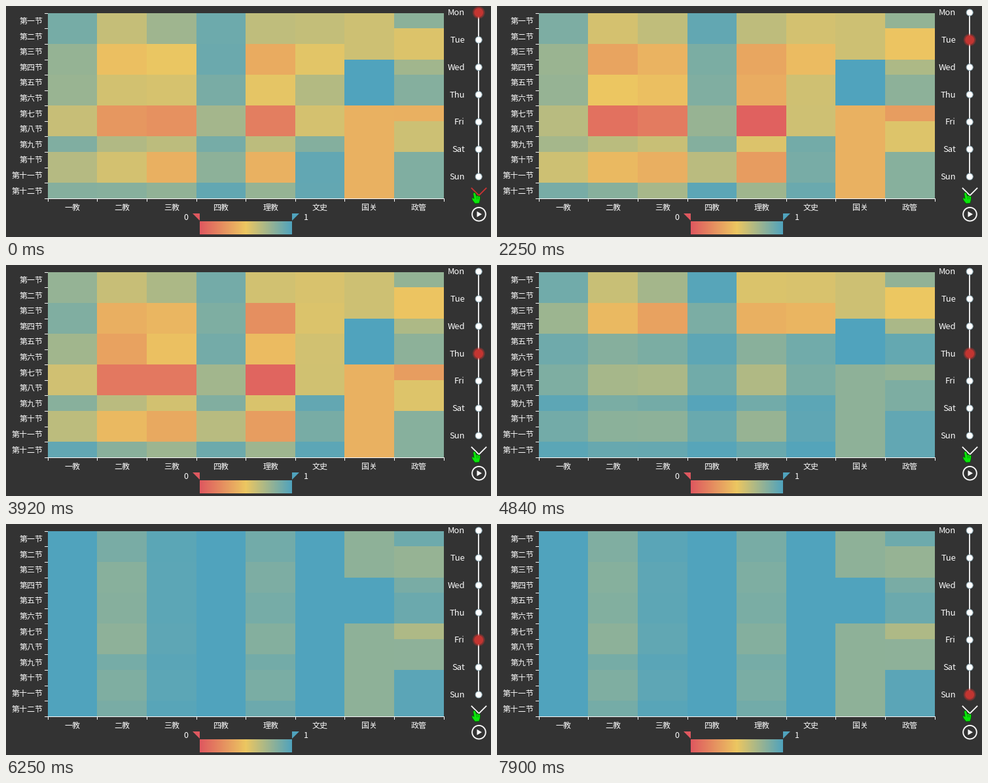
Animation, 741 px wide and 353 px high, one loop 8000 ms. Source, as a matplotlib script:

```python
import numpy as np
import matplotlib.pyplot as plt
from matplotlib.animation import FuncAnimation
from matplotlib.collections import LineCollection
from matplotlib.patches import Circle, Polygon

W, H, DPI = 741, 353, 100
LOOP, STEP = 8000, 20
FONT = "Noto Sans CJK JP"
BG, WHITE, RED = "#333333", "#fafafa", "#c23531"
LEFT, RIGHT, TOP, BOTTOM = 64, 668.8, 11, 294
SCALE = np.array([(223, 88, 95), (236, 199, 97), (80, 163, 189)]) / 255

DAYS = ["Mon", "Tue", "Wed", "Thu", "Fri", "Sat", "Sun"]
PERIODS = ["第%s节" % n for n in
           ["一", "二", "三", "四", "五", "六", "七", "八", "九", "十", "十一", "十二"]]
SWITCHES = [500, 2250, 3650, 4840, 6250, 7630]

# How full a hall is in its first and last class, and at weekends
HALLS = {"一教": (.4, .8, 0), "二教": (1.15, 1.2, 1), "三教": (1, 1.4, .25),
         "四教": (.15, .6, 0), "理教": (1.25, 1.4, .85), "文史": (1.2, .05, 0)}
NAMES = [*HALLS, "国关", "政管"]
CLASSES = [2, 2, 2, 2, 1, 2, 1]
DEMAND = np.array([.33, .54, .44, .70, .29, .47, .17])


def px(n):
    return n * 72 / DPI


def colours(values):
    return np.stack([np.interp(values, [0, .5, 1], c) for c in SCALE.T], axis=-1)


def week_factor(d):
    """Load by period: steady to Thursday, a light Friday afternoon, a quiet weekend."""
    period = np.arange(len(PERIODS))
    if d < 4:
        return np.full(period.size, .9 if d == 0 else 1.03)
    if d == 4:
        return np.where(period < 4, 1, .33)
    return np.where(period < 9, .45, .2)


def day(d):
    """Share of free seats, one row per period and one column per hall."""
    rng = np.random.default_rng(d)
    factor = week_factor(d)
    columns = []
    for first, last, weekend in HALLS.values():
        if d < 5:
            load = DEMAND * np.linspace(first, last, len(DEMAND))
            load = load + rng.normal(0, .04, load.size)
            columns.append(np.repeat(load, CLASSES) * factor)
        else:
            load = weekend * (.09 + .15 * DEMAND + rng.normal(0, .01, DEMAND.size))
            columns.append(np.repeat(load, CLASSES))
    # Two small departments with their own timetables
    load = np.repeat([.45, .05, .62, .62], 3) * factor
    columns.append(np.round(load * 5) / 5)
    columns.append(np.repeat([.21, .50, .29, .19, .67, .44, .17],
                             [1, 2, 1, 2, 1, 2, 3]) * factor)
    return colours(1 - np.clip(np.stack(columns, axis=1), 0, 1))


week = [day(d) for d in range(len(DAYS))]

fig = plt.figure(figsize=(W / DPI, H / DPI), dpi=DPI, facecolor=BG)
ax = fig.add_axes([0, 0, 1, 1])
ax.axis("off")


def label(x, y, text, size, align):
    ax.text(x, y, text, size=px(size), family=FONT, color=WHITE, ha=align, va="baseline")


def shape(points, color, **style):
    ax.add_patch(Polygon(points, facecolor=color, **style))


# Heat map with its axes
xs = np.linspace(LEFT, RIGHT, len(NAMES) + 1)
ys = np.linspace(TOP, BOTTOM, len(PERIODS) + 1)
edge_x, edge_y = np.floor(xs + .3), np.floor(ys + .3)
cells = ax.pcolormesh(edge_x, edge_y, week[0], antialiased=False, zorder=2)
lines = [[(59, y + .5), (64, y + .5)] for y in edge_y]
lines += [[(x + .5, 294), (x + .5, 299)] for x in edge_x]
lines.append([(LEFT, 294.5), (RIGHT + .2, 294.5)])
ax.add_collection(LineCollection(lines, colors=WHITE, linewidths=px(1),
                                 snap=False, zorder=1))
for y, name in zip((ys[:-1] + ys[1:]) / 2, PERIODS):
    label(56.5, y + 4.3, name, 12, "right")
for x, name in zip((xs[:-1] + xs[1:]) / 2, NAMES):
    label(x, 312, name, 12, "center")

# Colour scale
ax.imshow(colours(np.linspace(0, 1, 141))[None], extent=(296, 437, 349, 329),
          aspect="auto", interpolation="nearest")
shape([(285, 317), (296, 317), (296, 328)], SCALE[0], lw=0)
shape([(437, 317), (448, 317), (437, 328)], SCALE[2], lw=0)
label(275, 327, "0", 12.5, "center")
label(458, 327, "1", 12.5, "center")

# Timeline
AXIS = 722.2
stops = np.linspace(10, 260.8, len(DAYS))
ax.plot([AXIS, AXIS], [stops[0], stops[-1]], color="#e6e6e6", lw=px(2), zorder=3)
for y, name in zip(stops, DAYS):
    ax.add_patch(Circle((AXIS, y), 5, fc="white", ec="#8fabb6", lw=px(1), zorder=4))
    label(701, y + 4.2, name, 13, "right")
marker = [Circle((AXIS, 10), r, fc=RED, alpha=a, lw=0, zorder=5)
          for r, a in [(9.6, .3), (8.4, .4), (6.8, 1)]]
for disc in marker:
    ax.add_patch(disc)

# Buttons
check, = ax.plot([711.5, 722.5, 733.5], [278.5, 289.5, 278.5], lw=px(1.8), zorder=4)
ax.add_patch(Circle((722.5, 318.2), 10.3, fc="none", ec=WHITE, lw=px(1.9)))
shape([(719.5, 313.8), (727, 318.2), (719.5, 322.6)], WHITE, lw=0)

# Hand pointer
shape([(713.6, 286.5), (715.2, 284.8), (717.4, 286), (718.6, 290.3), (720.5, 289.5),
       (722, 290.4), (724, 290.6), (724.8, 293), (724, 298), (722.8, 301.6),
       (716.6, 302), (712.4, 296.6), (711.6, 293.4), (713.2, 292.8), (715, 294.4)],
      "#0be60b", ec="#0a5a0a", lw=px(1), zorder=6)
for x in (719, 721.5):
    ax.plot([x, x + .3], [291.5, 295], color="#0a8a0a", lw=px(.8), zorder=7)

ax.set_xlim(0, W)
ax.set_ylim(H, 0)


def ease(p):
    return 16 * p ** 5 if p < .5 else 1 - 16 * (1 - p) ** 5


def update(k):
    t = k * STEP + 10
    now = sum(t >= s for s in SWITCHES)
    y = stops[now]
    if now:
        # The marker moves in ticks of 90 ms within a 300 ms ease
        tick = (t - SWITCHES[now - 1]) // 90
        p = ease(min(tick * 90 / 300, 1))
        y = stops[now - 1] + (y - stops[now - 1]) * p
    cells.set_array(week[now])
    for disc in marker:
        disc.center = (AXIS, y)
    check.set_color(WHITE if now else "#cc3333")
    return [cells, check, *marker]


anim = FuncAnimation(fig, update, frames=LOOP // STEP, interval=STEP,
                     repeat=True, repeat_delay=0, blit=False)
plt.show()
```
